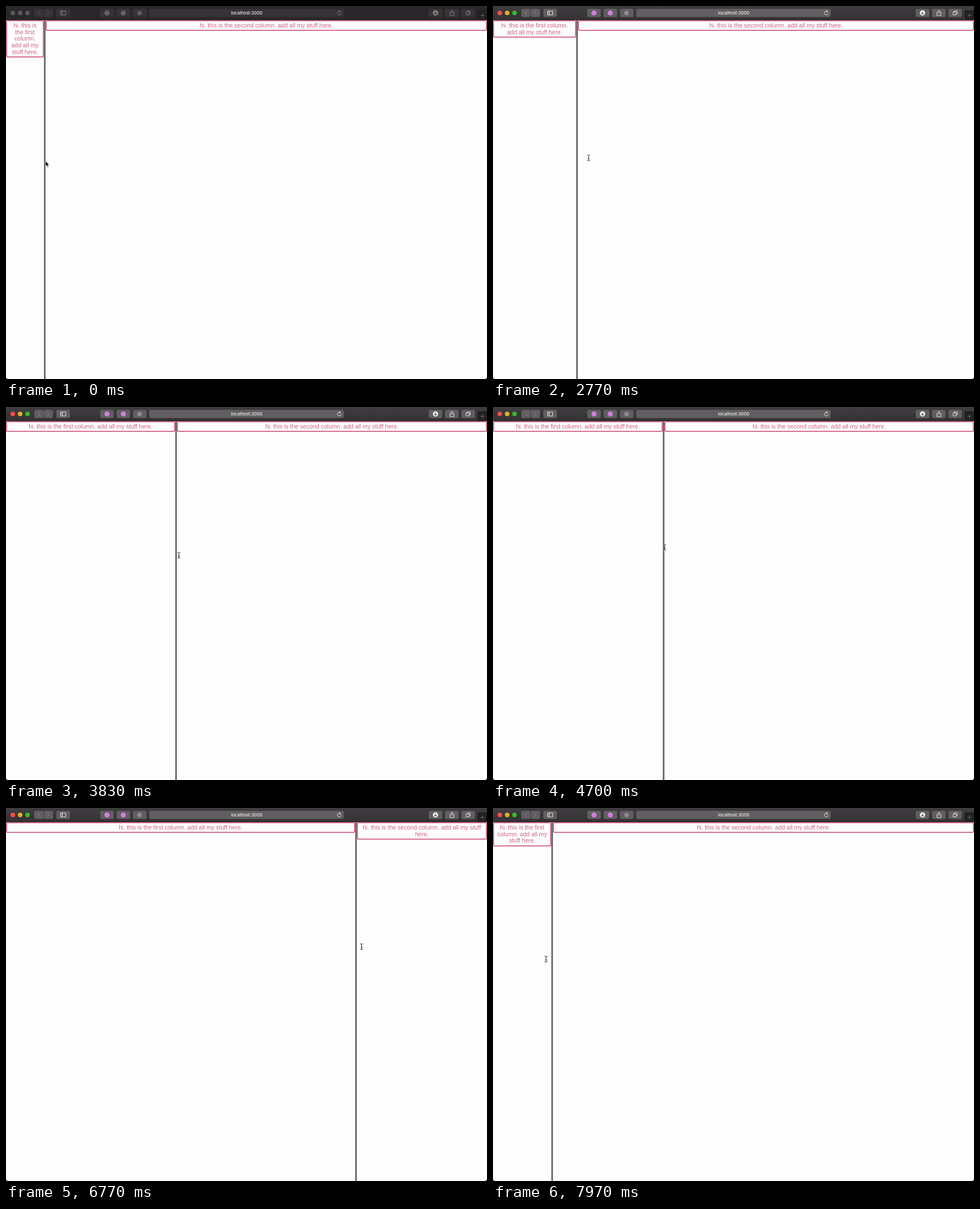
An HTML page for the animation above (8 s loop, 850x659 px).

```html
<!DOCTYPE html>
<html lang="en">
<head>
<meta charset="utf-8">
<title>Split columns</title>
<style>
html, body { margin: 0; width: 100%; height: 100%; overflow: hidden; background: #000; }
#win { position: absolute; left: 0; top: 0; width: 850px; height: 659px; overflow: hidden; background: #fefdfe; border-radius: 4px; }
#bar {
  --btn: #363336; --icon: #858385; --dim: #605d60; --ext: #656265;
  position: absolute; left: 0; top: 0; width: 850px; height: 25px;
  background: #2a272a; color: var(--icon);
}
#bar.on { --btn: #615e61; --icon: #f0eff0; --dim: #8d8a8d; --ext: #cf7fda; background: linear-gradient(#403d40, #343134); }
.light { fill: #5a575a; }
.on .light { fill: var(--c); }
.col {
  position: absolute; top: 25px; box-sizing: border-box;
  border: 2px solid #d4728f; border-radius: 2.5px; padding: 1.9px 5px;
  font: 10.54px/11.7px "Liberation Sans", Arial, sans-serif;
  color: #cb6785; text-align: center;
}
#left { left: 0; }
#right { right: 0; }
.picked span { background: #f8b9d6; }
#split { position: absolute; top: 25px; bottom: 0; width: 3px; background: #706d70; }
#pointer { position: absolute; left: 0; top: 0; overflow: visible; }
</style>
</head>
<body>
<div id="win">
  <svg id="bar" viewBox="0 0 850 25" fill="none" stroke="currentColor">
    <g id="lights" stroke="none"></g>
    <g id="buttons" fill="var(--btn)" stroke="none"></g>
    <path d="M60 9l-3.2 3.3 3.2 3.3M73 9l3.2 3.3-3.2 3.3" stroke="var(--dim)"/>
    <path d="M96.5 8.8h9v7h-9zM99.5 8.8v7M97.5 10.7h1M97.5 12.5h1" stroke-width=".9"/>
    <g stroke="none">
      <circle cx="178.5" cy="12.3" r="4.5" fill="var(--ext)"/>
      <circle cx="207.3" cy="12.3" r="4.5" fill="var(--ext)"/>
      <circle cx="236" cy="12.3" r="4" fill="var(--dim)"/>
      <text x="425.5" y="15.4" text-anchor="middle" fill="#f2f1f2" font-family="Inter, sans-serif" font-weight="500" font-size="7.7">localhost:3000</text>
      <circle cx="759" cy="12.3" r="4.7" fill="currentColor"/>
    </g>
    <path d="M591.2 10a3.3 3.3 0 1 0 1 2.5M589 7.5l2.4 2.3-2.7 1" stroke-width=".9"/>
    <path d="M759 9.5v5M756.8 12.5l2.2 2.3 2.2-2.3" stroke="var(--btn)" stroke-width="1.1"/>
    <path d="M786.5 11h-2v6h7v-6h-2M788 14V7.7M786 9.5l2-2 2 2" stroke-width=".9"/>
    <path d="M815 10.5V8.7h5.5v5h-2M813 10.7h5.4v5H813z" stroke-width=".9"/>
    <path d="M834.5 25V8.5H850V25" fill="#242124" stroke="#171517"/>
    <path d="M838.5 16.5h7M842 13v7" stroke="#777477" stroke-width=".8"/>
    <path d="M0 24.6h850" stroke="#171517" stroke-width=".8"/>
  </svg>
  <div id="split"></div>
  <div class="col" id="left">hi. this is the first column. add all my stuff here.</div>
  <div class="col" id="right"><span>hi. this is the second column. add all my stuff here.</span></div>
  <svg id="pointer" width="1" height="1">
    <defs><path id="caret" d="M-2.6-5.2Q-.3-5.2 0-4Q.3-5.2 2.6-5.2M0-4V4M-2.6 5.2Q-.3 5.2 0 4Q.3 5.2 2.6 5.2M-1.4 1.4h2.8"/></defs>
    <path id="arrow" d="M0 0v9.2l2.1-2 1.6 3.7 1.5-.7-1.6-3.5h2.9z" stroke="#fff" stroke-width=".6"/>
    <g id="beam" fill="none">
      <use href="#caret" stroke="#fff" stroke-width="2" opacity=".6"/>
      <use href="#caret" stroke="#222"/>
    </g>
  </svg>
</div>
<script>
const $ = id => document.getElementById(id);
const LOOP = 8000, LEAD = 60, GRAB = 2100, DESELECT = 6340;

$('lights').innerHTML = ['#fc4b48', '#e0b024', '#35bd2e'].map((c, i) =>
  `<circle class="light" style="--c:${c}" cx="${12 + 13 * i}" cy="12.3" r="4"/>`).join('');

const buttons = (x, count, w = 24, step = 28.9) => Array.from({ length: count }, (_, i) =>
  `<rect x="${x + i * step}" y="5" width="${w}" height="14.6" rx="3"/>`).join('');
$('buttons').innerHTML = buttons(50, 2, 16.2, 16.8) + buttons(89, 1) + buttons(166.5, 3)
  + buttons(253, 1, 344) + buttons(747, 3);

// Eased moves [start, end, destination, skew], holding still in between.
const glide = (from, ...moves) => t => moves.reduce((pos, [start, end, to, skew = 1]) => {
  const u = Math.min(1, Math.max(0, (t - start) / (end - start))) ** skew;
  return pos + (to - pos) * u * u * (3 - 2 * u);
}, from);

const splitX = glide(67, [GRAB, 3400, 376, 1.66], [3400, 3840, 299], [3840, 4270, 468],
  [4270, 4710, 300], [4710, 5400, 513], [DESELECT, 6930, 640], [7070, 8100, 93, .617]);
const drift = glide(5, [30, 330, -6], [500, 1300, 2], [5430, 6070, 4], [DESELECT, 6600, 0]);
const pointerY = glide(274, [500, 1300, 261], [GRAB, 2770, 268.5], [2900, 4700, 248, 1.5],
  [5430, 6070, 245], [DESELECT, 7970, 267, 3]);

function draw() {
  const t = performance.now() % LOOP, x = Math.round(splitX(t)), beam = t >= GRAB;
  $('left').style.width = x + 'px';
  $('split').style.left = x + 'px';
  $('right').style.left = x + 3 + 'px';
  $('right').classList.toggle('picked', t >= 5000 && t < DESELECT);
  $('bar').classList.toggle('on', t >= 600);
  $('arrow').style.display = beam ? 'none' : '';
  $('beam').style.display = beam ? '' : 'none';
  $('pointer').style.transform = `translate(${splitX(t + LEAD) - 2 + drift(t)}px, ${pointerY(t)}px)`;
  requestAnimationFrame(draw);
}
draw();
</script>
</body>
</html>
```
